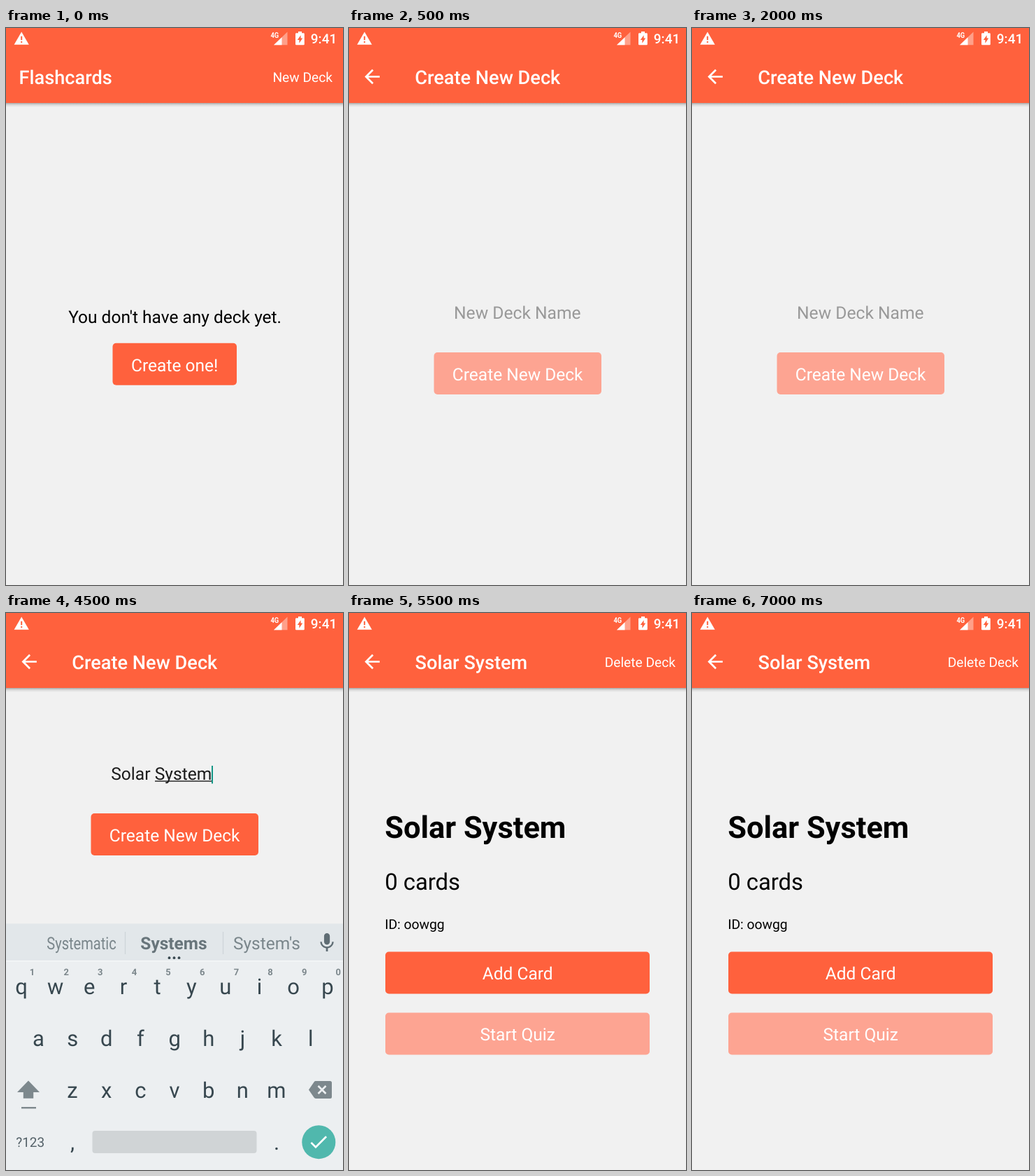
These frames come from a looping animation (482x795 px, 8000 ms). An HTML page:

```html
<!DOCTYPE html>
<html lang="en">
<head>
<meta charset="utf-8">
<title>Flashcards</title>
<style>
  html, body { margin: 0; width: 100%; height: 100%; overflow: hidden; background: #f1f1f1; }
  svg { display: block; width: 100vw; height: 100vh; }
  text { font-family: Roboto, sans-serif; font-size: 24.5px; text-rendering: geometricPrecision; white-space: pre; }
  .mid { text-anchor: middle; }
  .title { font-size: 27.15px; font-weight: 500; fill: #fff; }
  .action { font-size: 19.2px; fill: #fff; text-anchor: end; }
  .btn rect { fill: #ff613d; }
  .btn.off rect { fill: #fda492; }
  .btn text { fill: #fff; text-anchor: middle; }
  .key { font-size: 31px; fill: #37474f; text-anchor: middle; }
  .hint { font-size: 13px; font-weight: 700; fill: #7c878c; text-anchor: middle; }
  .word { fill: #7a868b; text-anchor: middle; }

  /* Hard cuts between screens */
  .screen { visibility: hidden; animation: 8s step-end infinite; }
  #empty { animation-name: empty; }
  #form { animation-name: form; }
  #typed { animation-name: typed; }
  #deck { animation-name: deck; }
  #back { animation-name: back; }
  #head { animation-name: head; }
  @keyframes empty { 0% { visibility: visible } 6.25%, 100% { visibility: hidden } }
  @keyframes form { 0% { visibility: hidden } 6.25% { visibility: visible } 37.5%, 100% { visibility: hidden } }
  @keyframes typed { 0% { visibility: hidden } 37.5% { visibility: visible } 68.75%, 100% { visibility: hidden } }
  @keyframes deck { 0% { visibility: hidden } 68.75%, 100% { visibility: visible } }
  @keyframes back { 0% { visibility: hidden } 6.25%, 100% { visibility: visible } }
  @keyframes head { 0% { visibility: hidden } 6.25% { visibility: visible } 68.75%, 100% { visibility: hidden } }
</style>
</head>
<body>
<svg viewBox="0 0 482 795" preserveAspectRatio="none">
  <defs>
    <linearGradient id="shade" x2="0" y2="1">
      <stop stop-color="#000" stop-opacity=".3"/>
      <stop offset=".45" stop-color="#000" stop-opacity=".1"/>
      <stop offset="1" stop-color="#000" stop-opacity="0"/>
    </linearGradient>
  </defs>

  <rect width="482" height="795" fill="#f1f1f1"/>
  <rect y="107" width="482" height="6" fill="url(#shade)"/>
  <rect width="482" height="107" fill="#ff613d"/>

  <!-- Status bar -->
  <g fill="#fff">
    <path d="M22.2 5.5L32.8 23.8H11.6Z"/>
    <path d="M21.2 11.8h2v5.4h-2zM21.2 19h2v2.1h-2z" fill="#ff613d"/>
    <path d="M402.5 5.5V24.2H383Z" opacity=".4"/>
    <path d="M394.5 13.2V24.2H383Z"/>
    <text transform="translate(378.5 14) scale(.85 1)" style="font-size:11px;font-weight:700">4G</text>
    <path d="M418 5h5v2.3h2.6q1.2 0 1.2 1.2V23q0 1.3-1.2 1.3h-10.4q-1.2 0-1.2-1.3V8.5q0-1.2 1.2-1.2H418Z"/>
    <path d="M421.6 10.2V14.5H424.2L419.4 21.8V17H416.8Z" fill="#ff613d"/>
    <text x="435.8" y="22" style="font-size:19px;font-weight:500">9:41</text>
  </g>

  <g id="back" class="screen">
    <path transform="translate(17.1 53.4) scale(1.339)" fill="#fff"
      d="M20 11H7.83l5.59-5.59L12 4l-8 8 8 8 1.41-1.41L7.83 13H20z"/>
  </g>
  <g id="head" class="screen"><text class="title" x="94.2" y="80">Create New Deck</text></g>

  <g id="empty" class="screen">
    <text class="title" x="18.6" y="80">Flashcards</text>
    <text class="action" x="467" y="77">New Deck</text>
    <text class="mid" x="241.6" y="421">You don't have any deck yet.</text>
    <g class="btn">
      <rect x="152.5" y="449.8" width="177.5" height="60" rx="5"/>
      <text x="241.2" y="489.5">Create one!</text>
    </g>
  </g>

  <g id="form" class="screen">
    <text x="150" y="414.5" fill="#999" style="font-size:24.65px">New Deck Name</text>
    <g class="btn off">
      <rect x="121.5" y="463" width="239.5" height="60" rx="5"/>
      <text x="241.2" y="503">Create New Deck</text>
    </g>
  </g>

  <g id="typed" class="screen">
    <text x="150.2" y="237.5" fill="#1c1c1c" style="font-size:24.65px">Solar System</text>
    <rect x="213" y="239.3" width="82" height="1.4" fill="#1c1c1c"/>
    <rect x="294" y="218" width="2" height="25.5" fill="#149686"/>
    <g class="btn">
      <rect x="121.5" y="286" width="239.5" height="60" rx="5"/>
      <text x="241.2" y="325.7">Create New Deck</text>
    </g>

    <rect y="443.5" width="482" height="351.5" fill="#eceff1"/>
    <rect y="443.5" width="482" height="53" fill="#e2e7ea"/>
    <rect y="496" width="482" height="1.5" fill="#f5f7f8"/>
    <path d="M170.5 455V487M310.5 455V487" stroke="#cdd4d8" stroke-width="1.2"/>
    <text class="word" transform="translate(108 480) scale(.82 1)">Systematic</text>
    <text class="word" x="240" y="480" style="font-weight:700;fill:#68757b">Systems</text>
    <text class="word" x="373" y="480">System's</text>
    <g fill="#37474f">
      <circle cx="233.5" cy="492.2" r="1.9"/><circle cx="240.5" cy="492.2" r="1.9"/><circle cx="247.5" cy="492.2" r="1.9"/>
    </g>
    <path transform="translate(442.6 454.3) scale(1.37)" fill="#5f6d74"
      d="M12 14c1.66 0 3-1.34 3-3V5c0-1.66-1.34-3-3-3S9 3.34 9 5v6c0 1.66 1.34 3 3 3zm5.3-3c0 3-2.54 5.1-5.3 5.1S6.7 14 6.7 11H5c0 3.41 2.72 6.23 6 6.72V21h2v-3.28c3.28-.48 6-3.3 6-6.72z"/>
    <g id="keys"></g>

    <g fill="#7d888d">
      <path d="M32 667.5L48 684H39.2V692.7H24.8V684H16Z"/>
      <rect x="22" y="705" width="21" height="2.4"/>
      <path d="M443 668H463.5Q466 668 466 670.5V690.5Q466 693 463.5 693H443Q441.5 693 440.5 691.6L433 680.5 440.5 669.4Q441.5 668 443 668Z"/>
    </g>
    <path d="M446.5 675L457.5 686M457.5 675L446.5 686" stroke="#eceff1" stroke-width="2.6"/>
    <text x="34.7" y="762" class="key" style="font-size:19px;fill:#546168">?123</text>
    <rect x="123.5" y="739" width="235" height="32" rx="4" fill="#d0d4d6"/>
    <circle cx="447.3" cy="755.2" r="24" fill="#50b8ad"/>
    <path transform="translate(430.9 738.8) scale(1.34)" fill="#fff" d="M9 16.17L4.83 12l-1.42 1.41L9 19 21 7l-1.41-1.41z"/>
  </g>

  <g id="deck" class="screen">
    <text class="title" x="94.6" y="80">Solar System</text>
    <text class="action" x="467" y="77">Delete Deck</text>
    <text x="51.3" y="321" style="font-size:43.4px;font-weight:700">Solar System</text>
    <text x="51.2" y="395" style="font-size:32.8px">0 cards</text>
    <text x="51.2" y="451" style="font-size:19.3px">ID: oowgg</text>
    <g class="btn">
      <rect x="52" y="483.5" width="378" height="60" rx="5"/>
      <text x="241.2" y="523.3">Add Card</text>
    </g>
    <g class="btn off">
      <rect x="52" y="570.5" width="378" height="60" rx="5"/>
      <text x="241.2" y="610.3">Start Quiz</text>
    </g>
  </g>
</svg>
<script>
  const keys = document.getElementById('keys');
  const step = 48.65;

  function row(chars, x, y, cls = 'key') {
    [...chars].forEach((ch, i) => {
      const t = document.createElementNS('http://www.w3.org/2000/svg', 'text');
      t.setAttribute('class', cls);
      t.setAttribute('x', x + i * step);
      t.setAttribute('y', y);
      t.textContent = ch;
      keys.append(t);
    });
  }

  row('qwertyuiop', 22, 543.5);
  row('1234567890', 37.5, 517, 'hint');
  row('asdfghjkl', 46.5, 617.5);
  row('zxcvbnm', 95, 691.5);
  row(',', 95, 766);
  row('.', 387, 766);
</script>
</body>
</html>
```
